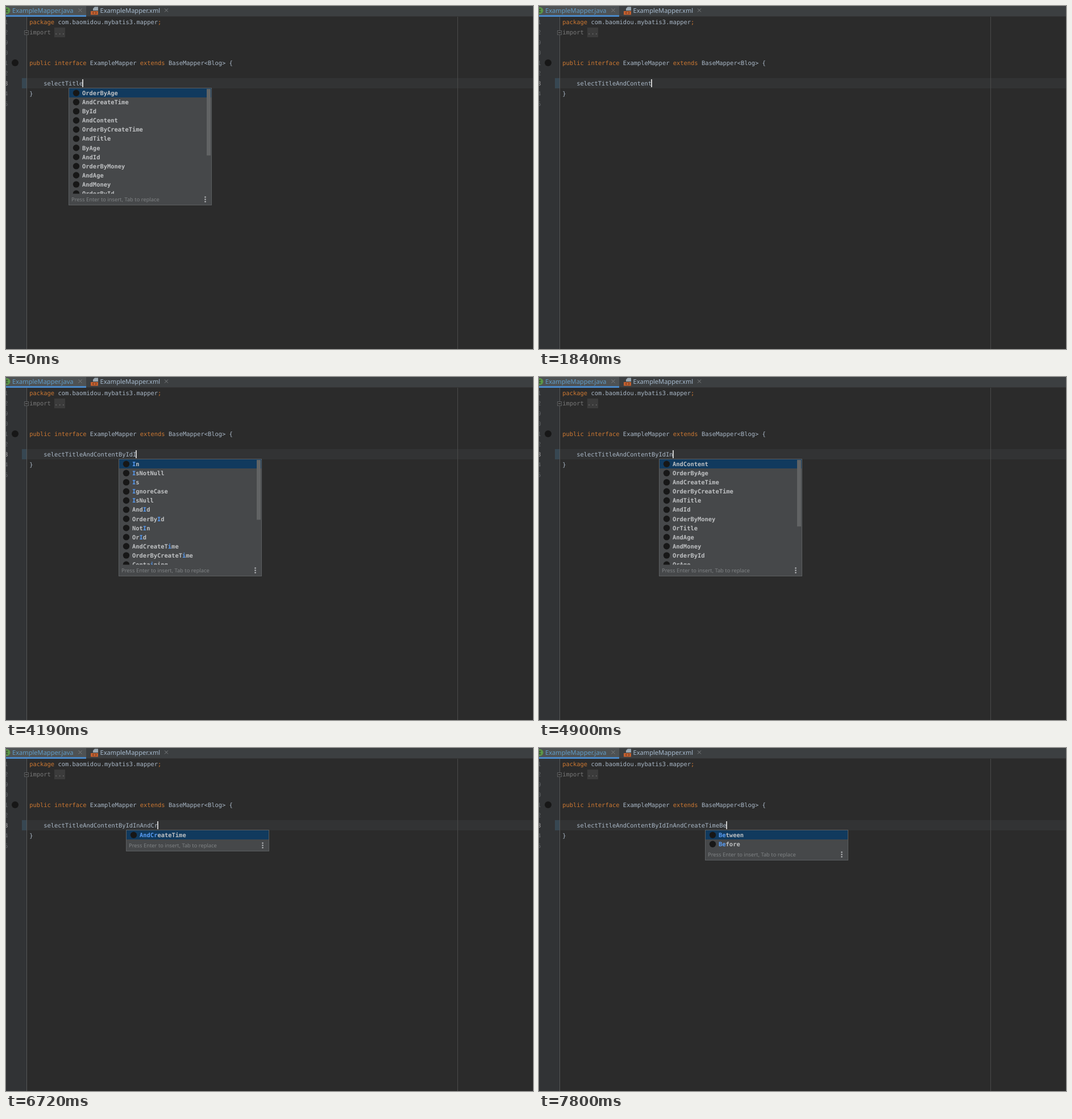
These frames come from a looping animation (927x604 px, 8000 ms). An HTML page:

```html
<!DOCTYPE html>
<html lang="en">
<head>
<meta charset="utf-8">
<title>Mapper method completion</title>
<style>
html, body { margin: 0; width: 100%; height: 100%; overflow: hidden; background: #2b2b2b; }
svg { display: block; }
text { white-space: pre; text-rendering: geometricPrecision; }
.code { font: 10.43px "DejaVu Sans Mono", monospace; fill: #a9b7c6; }
.kw { fill: #cc7832; }
.dim { fill: #787878; }
.num { fill: #606366; text-anchor: end; }
.ui { font: 11.1px "Noto Sans", "Open Sans", sans-serif; }
.item { font: bold 10.43px "DejaVu Sans Mono", monospace; fill: #bfc1c3; }
.hit { fill: #589df6; }
.hint { font: 9.35px "Noto Sans", "Open Sans", sans-serif; fill: #7f8284; }
</style>
</head>
<body>
<svg id="stage" width="927" height="604" viewBox="0 0 927 604"></svg>
<script>
const LOOP = 8000, CHAR = 6.279, LINE = 17.95, ROW = 16.09, TEXT_X = 66.2, TOP = 144, VIEW = 185;
const stage = document.getElementById('stage');

function add(parent, tag, attrs, content) {
  const el = document.createElementNS('http://www.w3.org/2000/svg', tag);
  for (const k in attrs) el.setAttribute(k, attrs[k]);
  if (content !== undefined) el.textContent = content;
  parent.appendChild(el);
  return el;
}
const rect = (p, x, y, width, height, fill) => add(p, 'rect', { x, y, width, height, fill });
const dot = (p, cx, cy, r, fill) => add(p, 'circle', { cx, cy, r, fill });
const path = (p, d, stroke, width = 1) => add(p, 'path', { d, stroke, 'stroke-width': width, fill: 'none' });
const baseline = line => 32 + LINE * line;

function codeLine(line, x, parts) {
  const el = add(stage, 'text', { class: 'code', x, y: baseline(line) });
  for (const [str, cls] of parts) add(el, 'tspan', cls ? { class: cls } : {}, str);
}

function drawEditor() {
  rect(stage, 0, 0, 927, 604, '#2b2b2b');
  rect(stage, 0, 19, 36, 585, '#313335');
  rect(stage, 36, 127, 891, 18, '#323334');
  rect(stage, 28, 127, 8, 18, '#374752');
  rect(stage, 36, 19, 1, 585, '#555657');
  rect(stage, 794, 19, 1, 585, '#4b4b4b');

  rect(stage, 0, 0, 927, 19, '#3c3f41');
  rect(stage, 0, 0, 141, 17, '#4e5254');
  rect(stage, 0, 16, 141, 3, '#4a88c7');
  rect(stage, 141, 18, 786, 1, '#323232');
  dot(stage, 1.5, 8, 6, '#5b9648');
  path(stage, 'M0 5.5H3.5M1.5 5.5V10.5M0 10.5H3.5', '#2f3d2a');
  add(stage, 'text', { class: 'ui', x: 11, y: 12, fill: '#5f9cc9' }, 'ExampleMapper.java');
  add(stage, 'text', { class: 'ui', x: 165.5, y: 12, fill: '#a6bace' }, 'ExampleMapper.xml');
  for (const x of [130.5, 282]) path(stage, `M${x - 3} 4.5l6 6m0 -6l-6 6`, '#7b7e80');
  add(stage, 'path', { d: 'M153 4.5L156 1.5H162V8H153Z', fill: '#9aa7b0' });
  rect(stage, 149, 9, 13, 6.5, '#c4602f');
  path(stage, 'M154.5 10.2l-2 2l2 2M157 10.2l2 2l-2 2', '#4a2a1c');

  ['1', '2', '9', '10', '11', '12', '13', '14', '15'].forEach((n, i) => {
    const el = add(stage, 'text', { class: 'code num', x: 3.5, y: baseline(i) }, n);
    if (n === '13') el.style.fill = '#a4a3a3';
  });
  dot(stage, 16, 100, 6, '#171717');

  rect(stage, 85, 38, 19, 17, '#3b3b3b');
  add(stage, 'rect', { x: 32.5, y: 43.5, width: 7, height: 7, fill: '#2b2b2b', stroke: '#5c5e60' });
  path(stage, 'M34 47H38', '#8a8c8e');
  codeLine(0, 41.2, [['package', 'kw'], [' com.baomidou.mybatis3.mapper'], [';', 'kw']]);
  codeLine(1, 41.2, [['import ...', 'dim']]);
  codeLine(4, 41.2, [['public interface ', 'kw'], ['ExampleMapper '], ['extends ', 'kw'], ['BaseMapper<Blog> {']]);
  codeLine(7, 41.2, [['}']]);
}

// Indices of the letters in an item that match the typed query.
function hits(item, query) {
  const found = new Set();
  let from = 0;
  for (const c of query) {
    let i = item.indexOf(c, from);
    if (i < 0) i = item.toLowerCase().indexOf(c.toLowerCase(), from);
    if (i < 0) break;
    found.add(i);
    from = i + 1;
  }
  return found;
}

function drawPopup(parent, start, query, list, total, stale) {
  const items = list.split(' ');
  const count = total || items.length;
  const left = Math.round(TEXT_X + start * CHAR - 25);
  const view = Math.min(VIEW, (stale || count) * ROW);
  const height = Math.round(view + 22);
  const box = add(parent, 'svg', { x: left, y: TOP, width: 252, height });
  rect(box, 0, 0, 252, height, '#5b5e60');
  rect(box, 1, 1, 250, height - 2, '#46484a');
  const rows = add(box, 'svg', { x: 1, y: 1, width: 250, height: stale ? height - 2 : view + 0.5 });
  rect(rows, 0, 0, 250, 16, '#113a5e');
  items.forEach((item, i) => {
    const y = i * ROW;
    dot(rows, 12.5, y + 8.2, 5.7, '#171717');
    const el = add(rows, 'text', { class: 'item', x: 23, y: y + 12 });
    const on = hits(item, query);
    [...item].forEach((c, k) => add(el, 'tspan', on.has(k) ? { class: 'hit' } : {}, c));
  });
  if (count * ROW > VIEW) rect(rows, 242, 1, 7, VIEW * VIEW / (count * ROW) - 1, '#616364');
  if (stale) return;
  add(box, 'text', { class: 'hint', x: 5, y: height - 7 }, 'Press Enter to insert, Tab to replace');
  for (const dy of [14.5, 10.5, 6.5]) dot(box, 240.5, height - dy, 1.3, '#b4b6b8');
}

const START = 'OrderByAge AndCreateTime ById AndContent OrderByCreateTime AndTitle ByAge AndId OrderByMoney AndAge AndMoney OrderById';
const AFTER_CONTENT = 'AndContent OrderByAge AndCreateTime ById OrderByCreateTime AndTitle ByAge AndId OrderByMoney AndAge AndMoney OrderById';
const AFTER_ID = 'AndContent OrderByAge IsNotNull AndCreateTime In OrderByCreateTime AndTitle Is AndId OrderByMoney OrTitle AndAge';
const AFTER_IN = 'AndContent OrderByAge AndCreateTime OrderByCreateTime AndTitle AndId OrderByMoney OrTitle AndAge AndMoney OrderById OrAge';
const AFTER_TIME = 'AndContent OrderByAge AndCreateTime IsNotNull OrderByCreateTime AndTitle Between AndId OrderByMoney OrTitle AndAge AndMoney';
const A_FIRST = 'AndCreateTime AndContent AndTitle AndId AndAge AndMoney OrderByAge OrderByCreateTime ByAge ByCreateTime';
const A_LATER = 'AndContent AndCreateTime AndTitle AndId AndAge AndMoney OrderByAge OrderByCreateTime OrAge OrCreateTime';
const AND = 'AndContent AndCreateTime AndTitle AndId AndAge AndMoney';
const BY = 'ById ByAge ByContent ByCreateTime ByMoney ByTitle OrderByAge OrderByCreateTime OrderByMoney OrderById OrderByContent OrderByTitle';
const IS = 'In IsNotNull Is IgnoreCase IsNull AndId OrderById NotIn OrId AndCreateTime OrderByCreateTime Containing';
const BE = 'Between Before OrderByAge OrderByCreateTime OrderByMoney OrderById OrderByContent OrderByTitle';

const title = 'selectTitle', content = title + 'AndContent', id = content + 'ById', inn = id + 'In', time = inn + 'AndCreateTime';

// at, accepted text, typed text, list, item total, caret hidden, rows kept while resizing
const steps = [
  [0, title, '', START, 18],
  [280, title, '', START, 18, true],
  [710, title, 'A', A_FIRST],
  [1080, title, 'AC', 'AndCreateTime AndContent'],
  [1350, title, 'ACo', 'AndContent'],
  [1470, title, 'ACon', 'AndContent'],
  [1840, content, ''],
  [1960, content, '', AFTER_CONTENT, 18],
  [2680, content, '', AFTER_CONTENT, 18, true],
  [2980, content, 'B', BY],
  [3790, id, ''],
  [3920, id, '', AFTER_ID, 40],
  [4190, id, 'I', IS, 20],
  [4750, inn, ''],
  [4900, inn, '', AFTER_IN, 18],
  [5170, inn, 'A', A_LATER],
  [5290, inn, 'An', AND],
  [5450, inn, 'And', AND],
  [6130, inn, 'AndC', 'AndContent AndCreateTime'],
  [6720, inn, 'AndCr', 'AndCreateTime'],
  [7130, time, '', AFTER_TIME, 40],
  [7520, time, 'B', BE],
  [7640, time, 'Be', BE, 0, false, 2],
  [7800, time, 'Be', 'Between Before']
];

function buildStep([, done, typed, list, total, hidden, stale]) {
  const g = add(stage, 'g', { display: 'none' });
  const text = done + typed;
  add(g, 'text', { class: 'code', x: TEXT_X, y: baseline(6) }, text);
  if (!hidden) rect(g, Math.round(TEXT_X + text.length * CHAR) - 1, 129, 2, 14, '#c8c8c8');
  // While the window resizes, the highlights still belong to the shorter query.
  if (list) drawPopup(g, done.length, stale ? typed.slice(0, -1) : typed, list, total, stale);
  return g;
}

drawEditor();
const scenes = steps.map(buildStep);
const begin = performance.now();
let shown = -1;

function tick(now) {
  const t = Math.max(0, now - begin) % LOOP;
  let i = steps.length - 1;
  while (steps[i][0] > t) i--;
  if (i !== shown) {
    if (shown >= 0) scenes[shown].setAttribute('display', 'none');
    scenes[i].removeAttribute('display');
    shown = i;
  }
  requestAnimationFrame(tick);
}
tick(begin);
</script>
</body>
</html>
```
